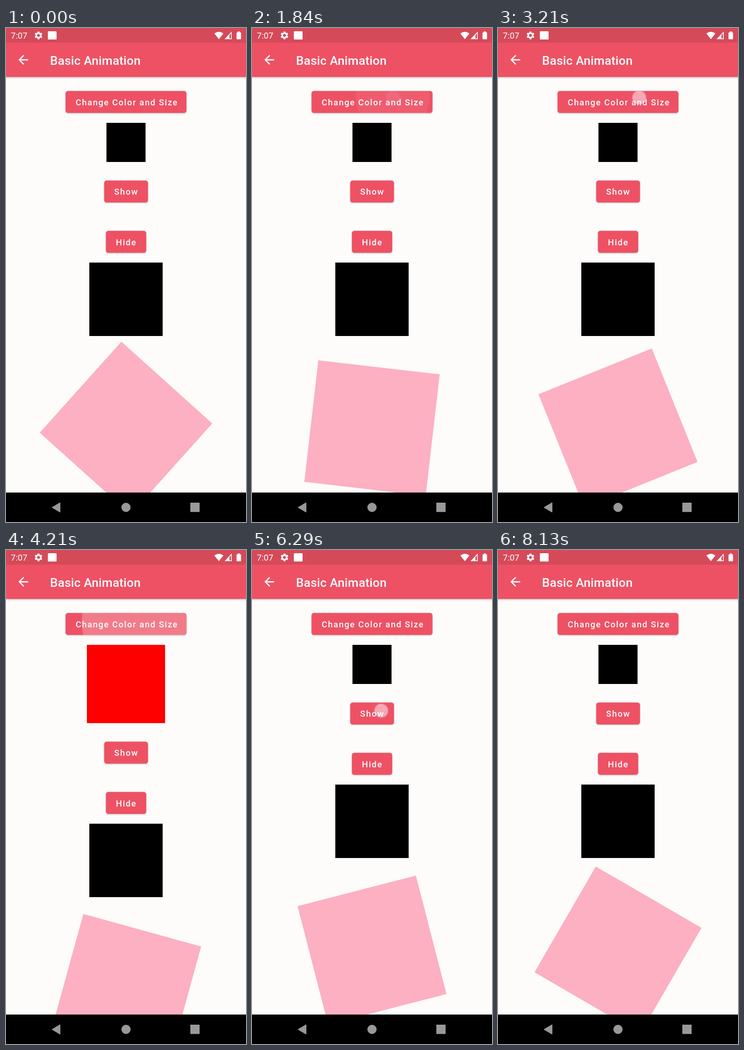
These frames come from a looping animation (522 by 1073 pixels, 8.22 s). An HTML page:

```html
<!DOCTYPE html>
<html lang="en">
<head>
<meta charset="utf-8">
<title>Basic Animation</title>
<style>
  html, body { margin: 0; width: 100%; height: 100%; overflow: hidden; background: #fdfcfb; }
  svg { display: block; width: 522px; height: 1073px; }
  text { font-family: Roboto, "Open Sans", sans-serif; fill: #fff; white-space: pre; }
  .label { font-size: 18.6px; font-weight: 500; letter-spacing: 1.66px; }
  .title { font-size: 26.6px; font-weight: 500; letter-spacing: .2px; }
  .clock { font-size: 18.6px; }
  .button { fill: #ee5164; filter: drop-shadow(0 1.5px 1.5px rgba(0, 0, 0, .25)); }
  .bar { fill: #ee5164; filter: drop-shadow(0 1px 2px rgba(0, 0, 0, .3)); }
  .icon { fill: #fff; }
</style>
</head>
<body>
<svg viewBox="0 0 522 1073">
  <defs>
    <clipPath id="sizeClip"><rect x="129.5" y="136.8" width="263" height="47.8" rx="5.3"/></clipPath>
    <clipPath id="showClip"><rect id="showClipBox" y="331.2" height="47.8" rx="5.3"/></clipPath>
    <radialGradient id="touch">
      <stop offset="0" stop-color="#fff" stop-opacity=".5"/>
      <stop offset=".68" stop-color="#fff" stop-opacity=".5"/>
      <stop offset=".78" stop-color="#fff" stop-opacity=".55"/>
      <stop offset=".82" stop-color="#c8a0e0" stop-opacity=".35"/>
      <stop offset="1" stop-color="#c8a0e0" stop-opacity="0"/>
    </radialGradient>
  </defs>

  <rect width="522" height="1073" fill="#fdfcfb"/>

  <rect class="button" x="129.5" y="136.8" width="263" height="47.8" rx="5.3"/>
  <g clip-path="url(#sizeClip)"><circle id="sizeRipple" fill="#fff"/></g>
  <text class="label" x="151.4" y="168">Change Color and Size</text>
  <rect id="box" y="206"/>

  <g id="upper">
    <rect id="showButton" class="button" y="331.2" height="47.8" rx="5.3"/>
    <g clip-path="url(#showClip)"><circle id="showRipple" fill="#fff"/></g>
    <text id="showLabel" class="label" y="362.3"></text>
    <rect id="panel" x="181.2" y="400.2" width="159.5"/>
  </g>

  <g id="lower">
    <rect class="button" x="217.3" y="440.5" width="87.7" height="47.8" rx="5.3"/>
    <text class="label" x="239" y="471.6">Hide</text>
    <rect x="181.2" y="509.5" width="159.5" height="159.5"/>
    <rect id="spinner" x="128.1" y="736.1" width="265.8" height="265.8" fill="#fcb0c2"/>
  </g>

  <rect class="bar" width="522" height="106.3"/>
  <rect width="522" height="32" fill="#d54a59"/>
  <text class="clock" x="10.6" y="22.8">7:07</text>
  <path class="icon" transform="translate(60.2 5.6) scale(.87)" d="M19.14 12.94c.04-.3.06-.61.06-.94 0-.32-.02-.64-.07-.94l2.03-1.58c.18-.14.23-.41.12-.61l-1.92-3.32c-.12-.22-.37-.29-.59-.22l-2.39.96c-.5-.38-1.03-.7-1.62-.94l-.36-2.54c-.04-.24-.24-.41-.48-.41h-3.84c-.24 0-.43.17-.47.41l-.36 2.54c-.59.24-1.13.57-1.62.94l-2.39-.96c-.22-.08-.47 0-.59.22L2.74 8.87c-.12.21-.08.47.12.61l2.03 1.58c-.05.3-.09.63-.09.94s.02.64.07.94l-2.03 1.58c-.18.14-.23.41-.12.61l1.92 3.32c.12.22.37.29.59.22l2.39-.96c.5.38 1.03.7 1.62.94l.36 2.54c.05.24.24.41.48.41h3.84c.24 0 .44-.17.47-.41l.36-2.54c.59-.24 1.13-.56 1.62-.94l2.39.96c.22.08.47 0 .59-.22l1.92-3.32c.12-.22.07-.47-.12-.61zM12 15.6A3.6 3.6 0 1 1 12 8.4a3.6 3.6 0 0 1 0 7.2z"/>
  <rect class="icon" x="91" y="7" width="19" height="18" rx="1.5"/>
  <path class="icon" d="M463 24.3L453.2 12.1Q463 4.3 472.8 12.1Z"/>
  <path d="M490.2 9.6V23.4H477.2Z" fill="none" stroke="#fff" stroke-width="1.6"/>
  <path class="icon" d="M486 14V24H476Z"/>
  <path class="icon" d="M504 7.5h4.6v2h1.4q1.2 0 1.2 1.2v12.6q0 1.2-1.2 1.2h-7.4q-1.2 0-1.2-1.2V10.700q0-1.2 1.200-1.2h1.400z"/>
  <path class="icon" transform="translate(21.7 53.100) scale(1.329)" d="M20 11H7.830l5.590-5.590L12 4l-8 8 8 8 1.410-1.410L7.830 13H20z"/>
  <text class="title" x="95.800" y="79.800">Basic Animation</text>

  <rect y="1009" width="522" height="64"/>
  <g fill="#999" stroke="#999" stroke-linejoin="round">
    <path d="M100.500 1041.300L117.500 1031.300V1051.300Z" stroke-width="1.500"/>
    <circle cx="261" cy="1041.200" r="9.500"/>
    <rect x="401.700" y="1031.800" width="18.600" height="18.600" stroke-width="1.600"/>
  </g>
  <circle id="dot" r="18" fill="url(#touch)"/>
</svg>
<script>
const LOOP = 8220, TURN = 3000, TOGGLE_DELAY = 90;
const SMALL = 85, PANEL = 159.5;

// [ms within one turn, degrees]
const SPIN = [[0, 41.8], [210, 67.9], [290, 75.4], [1210, 195.3],
              [1840, 276.5], [2130, 300], [2420, 327.15], [3000, 401.8]];

const sizeTaps = { at: [1822, 2560, 3300, 4127], x: 307, y: 151, cy: 160.7 };
const showTaps = { at: [4900, 5650, 6380, 7110], x: 281, y: 349, cy: 355.1 };

const $ = id => document.getElementById(id);
const clamp = v => Math.max(0, Math.min(1, v));
const mix = (a, b, k) => a + (b - a) * k;
const set = (id, attrs) => {
  const el = $(id);
  for (const key in attrs) el.setAttribute(key, attrs[key]);
};

// cubic-bezier(.4, 0, .2, 1)
function ease(p) {
  let lo = 0, hi = 1;
  for (let i = 0; i < 18; i++) {
    const s = (lo + hi) / 2, r = 1 - s;
    if (1.2 * s * r * r + .6 * s * s * r + s * s * s < p) lo = s; else hi = s;
  }
  return lo * lo * (3 - 2 * lo);
}

function angle(t) {
  const p = t % TURN;
  const i = SPIN.findIndex(k => k[0] > p);
  const [t0, a0] = SPIN[i - 1], [t1, a1] = SPIN[i];
  return mix(a0, a1, (p - t0) / (t1 - t0));
}

// critically damped spring that flips at every tap
function toggle(taps, t, speed) {
  const done = taps.at.map(a => a + TOGGLE_DELAY).filter(a => a <= t);
  if (!done.length) return { on: false, v: 0 };
  const x = (t - done[done.length - 1]) * speed;
  const s = x > 12 ? 1 : 1 - (1 + x) * Math.exp(-x);
  const on = done.length % 2 === 1;
  return { on, v: on ? s : 1 - s };
}

function ripple(id, taps, t, width) {
  const start = taps.at.find(a => t >= a && t < a + 375);
  if (start === undefined) return set(id, { opacity: 0 });
  const age = t - start, k = ease(clamp(age / 225));
  set(id, {
    cx: mix(taps.x, 261, k),
    cy: mix(taps.y, taps.cy, k),
    r: mix(width * .3, Math.hypot(width, 47.8) / 2 + 13.3, k),
    opacity: .245 * clamp(age / 75) * (1 - clamp((age - 225) / 150))
  });
}

function touch(t) {
  for (const taps of [sizeTaps, showTaps]) {
    const start = taps.at.find(a => t >= a - 110 && t < a + 35);
    if (start !== undefined)
      return set('dot', { cx: taps.x, cy: taps.y, opacity: 1 - clamp((t - start + 70) / 105) });
  }
  set('dot', { opacity: 0 });
}

function draw(t) {
  const grow = toggle(sizeTaps, t, .03);
  const show = toggle(showTaps, t, .02);
  const size = SMALL * (1 + grow.v), dy = SMALL * grow.v, open = PANEL * show.v;
  const width = show.on ? 87.7 : 95.2, left = 261.2 - width / 2;

  set('box', { x: 261 - size / 2, width: size, height: size,
               fill: `rgb(${Math.round(255 * grow.v)},0,0)` });
  set('upper', { transform: `translate(0 ${dy})` });
  set('lower', { transform: `translate(0 ${dy + open})` });
  set('showButton', { x: left, width });
  set('showClipBox', { x: left, width });
  set('showLabel', { x: left + 21.7 });
  $('showLabel').textContent = show.on ? 'Hide' : 'Show';
  set('panel', { height: open, opacity: show.v });
  set('spinner', { transform: `rotate(${angle(t)} 261 869)` });
  ripple('sizeRipple', sizeTaps, t, 263);
  ripple('showRipple', showTaps, t, width);
  touch(t);
}

const begin = performance.now();
function tick() {
  draw((performance.now() - begin) % LOOP);
  requestAnimationFrame(tick);
}
tick();
</script>
</body>
</html>
```
